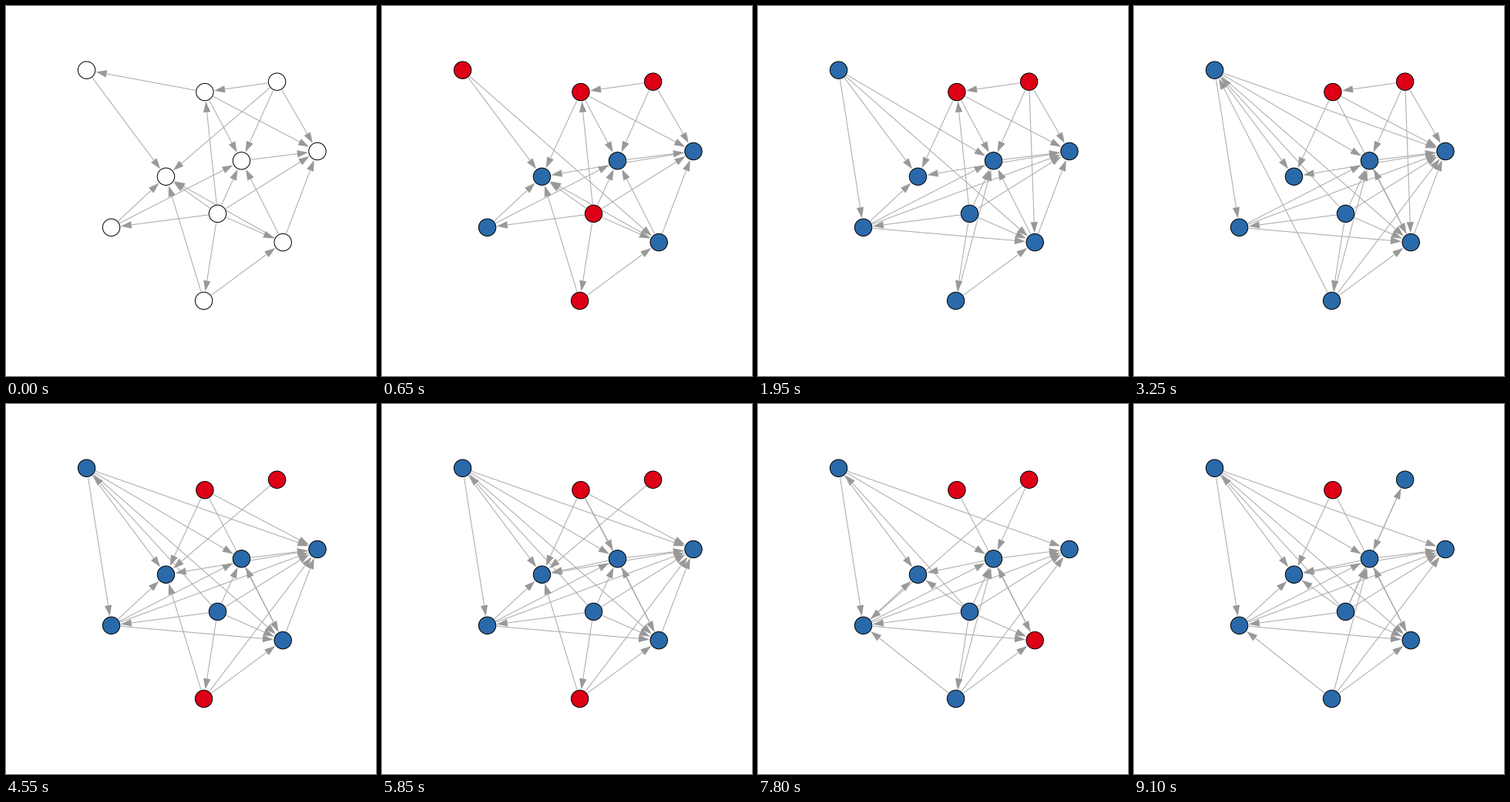
A matplotlib script for the animation above (9750 ms loop, 480 by 480 pixels).

```python
import numpy as np
import matplotlib.pyplot as plt
from matplotlib.animation import FuncAnimation
from matplotlib.patches import Circle, Polygon

SIZE, DPI = 480, 100
PX = 72 / DPI
RED, BLUE = "#de0016", "#2a6aaa"
LINE, HEAD = "#a9a9a9", "#999999"
RADIUS, GAP = 11.2, 12.3
HEAD_LEN, HEAD_HALF = 14, 4.7

NODES = {
    "A": (104.6, 83.2), "B": (257.9, 111.6), "C": (351.6, 98.2),
    "D": (404.0, 188.5), "E": (305.5, 200.8), "F": (207.5, 221.3),
    "G": (136.6, 287.3), "H": (274.5, 269.4), "I": (359.2, 306.6),
    "J": (256.6, 382.4),
}

START = "BA AF CB CF CE CD BE BD ED HB HE HD HF HG HJ HI GF GE JF JI IE ID IF"

# Per step: pairs toggle a directed link, single letters flip a node's colour
STEPS = [
    "BA CF AI BF DF A B C H J",
    "GD GI AG HF A H",
    "AE CI JF JE IF J",
    "JA HA HB AD GF J F",
    "JD BE BI J F",
    "GF CB CI JE",
    "JA JF CD CE CF J",
    "EF DF BI BE J",
    "DF BI J",
    "CF CG CI JF JG HF BF J",
    "CG CE BD JE DF C",
    "CG CI BE AI ID C I",
    "CG AI DF I J",
    "HC HJ BF C J",
]


def state(n):
    links, reds = set(START.split()), set()
    for step in STEPS[:n]:
        for item in step.split():
            (reds if len(item) == 1 else links).symmetric_difference_update({item})
    return sorted(links), reds


fig = plt.figure(figsize=(SIZE / DPI, SIZE / DPI), dpi=DPI, facecolor="white")
ax = fig.add_axes([0, 0, 1, 1])
ax.set_xlim(0, SIZE)
ax.set_ylim(SIZE, 0)
ax.axis("off")


def make_arrow(link):
    a, b = (np.array(NODES[k]) for k in link)
    u = (b - a) / np.hypot(*(b - a))
    side = np.array([-u[1], u[0]]) * HEAD_HALF
    tail, tip = a + u * GAP, b - u * GAP
    base = tip - u * HEAD_LEN
    line, = ax.plot(*zip(tail, base), color=LINE, lw=PX,
                    solid_capstyle="butt", zorder=1)
    head = Polygon([tip, base + side, base - side], fc=HEAD, ec="none", zorder=2)
    ax.add_patch(head)
    return line, head


all_links = {s for s in " ".join([START] + STEPS).split() if len(s) == 2}
arrows = {link: make_arrow(link) for link in sorted(all_links)}
discs = {k: ax.add_patch(Circle(p, RADIUS, ec="black", lw=PX, zorder=3))
         for k, p in NODES.items()}


def draw(n):
    links, reds = state(n)
    for link, parts in arrows.items():
        for part in parts:
            part.set_visible(link in links)
    for k, disc in discs.items():
        disc.set_facecolor("white" if n == 0 else RED if k in reds else BLUE)
    return []


anim = FuncAnimation(fig, draw, frames=len(STEPS) + 1, interval=650,
                     repeat=True, repeat_delay=0, blit=False)
plt.show()
```
